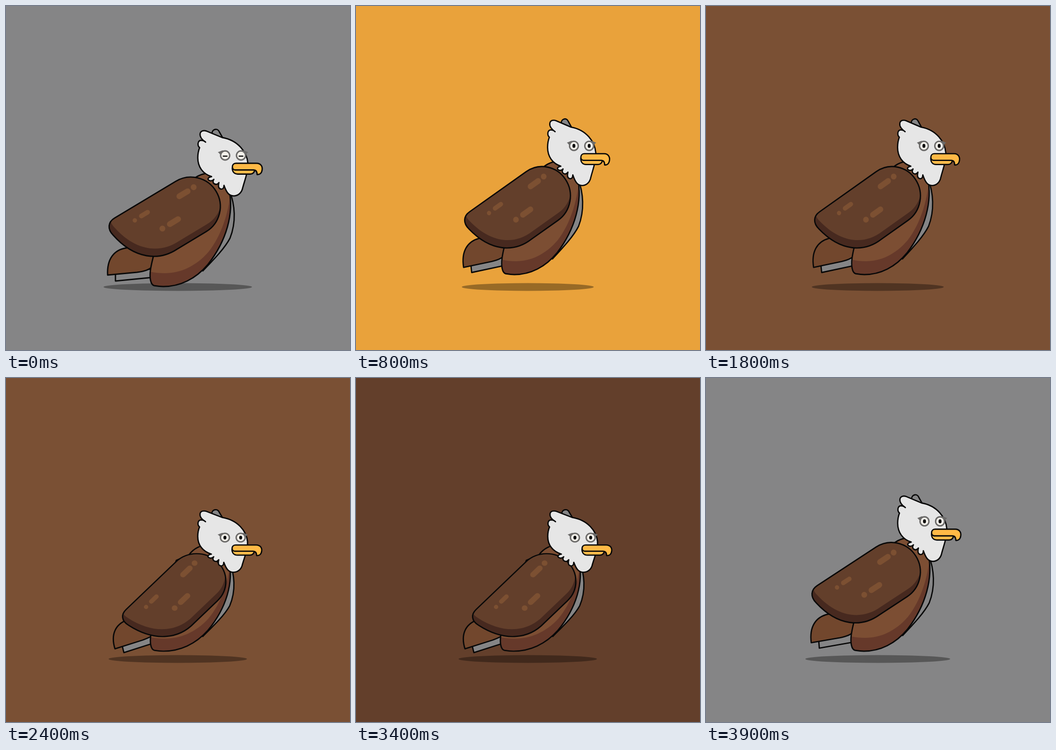
Recreate the animation shown at these times as an HTML page with a canvas. Size 748x748 px, loop 4 s.

```html
<!DOCTYPE html>
<html lang="en">
<head>
<meta charset="utf-8">
<title>Bouncing eagle</title>
<style>
html, body { margin: 0; width: 100%; height: 100%; overflow: hidden; background: #858586; }
canvas { display: block; width: 748px; height: 748px; }
</style>
</head>
<body>
<canvas id="stage" width="748" height="748"></canvas>
<script>
const ctx = document.getElementById('stage').getContext('2d');
const LOOP = 4000, BEAT = 1000, STEP = 100;
const GROUND = 610, AXIS = 406;
const INK = '#080808', GREY = '#858586', LID = '#6b6a69';
const BACKDROPS = [GREY, '#e9a23b', '#7a5034', '#633f2b'];

// Periodic track over one beat: keys are [phase, value].
function track(keys, linear) {
  const n = keys.length;
  const key = i => {
    const turn = Math.floor(i / n), [t, v] = keys[i - turn * n];
    return [t + turn, v];
  };
  const slope = i => {
    const [t0, v0] = key(i - 1), [t1, v1] = key(i + 1);
    return (v1 - v0) / (t1 - t0);
  };
  return p => {
    let i = n - 1;
    while (i > 0 && keys[i][0] > p + 1e-6) i--;
    const [t0, v0] = key(i), [t1, v1] = key(i + 1);
    const d = t1 - t0, u = (p - t0) / d;
    if (linear) return v0 + (v1 - v0) * u;
    const e = u * u * (3 - 2 * u);
    return v0 + (v1 - v0) * e
      + d * u * (1 - u) * ((1 - u) * slope(i) - u * slope(i + 1));
  };
}

const bottomAt = track([[0, 610], [.1, 615], [.2, 613], [.4, 594], [.6, 578], [.7, 578.5], [.8, 584], [.9, 594]]);
const widthAt = track([[0, 1], [.15, 1.033], [.4, .993], [.68, .955], [.8, .962], [.9, .98]]);
const heightAt = track([[0, 1], [.3, .93], [.4, .94], [.7, 1], [.8, 1], [.9, 1]]);
const dipAt = track([[0, 0], [.1, .25], [.4, 1], [.6, .6], [.8, .23], [.9, .12]]);
const tailAt = track([[0, 0], [.4, 13.2], [.6, 10.5], [.8, 6], [.9, 4.2]]);
const shadowAt = track([[0, 161.5], [.2, 170.5], [.6, 130.5], [.7, 129.5], [.9, 157.5]], true);

const shapes = {
  tail: 'M221 585C219 550 235 530 262 526L320 520V565C312 574 300 577 285 579Z',
  strip: 'M238 582V598L330 589V570Z',
  breast: 'M486 402C498 432 501 470 487 505C476 526 455 548 428 576Z',
  body: 'M398 387C408 372 425 364 440 364L485 400C496 450 480 510 439 562C412 594 378 610 342 610' +
    'C333 610 328 609 322 608C314 606 312 590 314 575C316 560 320 545 326 525L370 400Z',
  bodyLight: 'M488 405C484 450 468 500 440 535C412 567 378 581 345 581C333 581 322 580 310 577L300 355H470Z',
  wing: 'M-155 -64H0A64 64 0 0 1 0 64H-73C-120 66 -164 36 -177 -34C-181 -52 -172 -64 -155 -64Z',
  crest: 'M448 278C447 268 460 264 464 274L472 288Z',
  head: 'M421 308C416 304 416 293 424 292C428 292 432 294 434 296C428 292 421 285 422 278' +
    'C423 271 430 270 436 272L470 286C505 292 524 318 526 342V350C525 365 518 382 514 398' +
    'C511 408 503 413 495 413C484 413 479 404 474 390C474 395 472 399 467 398C462 397 461 392 463 384' +
    'C460 388 456 389 452 386C449 383 450 380 452 377C448 381 443 381 440 378C438 375 441 372 447 371' +
    'C428 365 417 350 417 330C417 320 419 313 421 308Z',
  lash: 'M-16 -7L-6 -11L-1 -10L-7 -3Q-13 -2 -13 -5Z',
  jaw: 'M492 352C492 361 497 365.5 504 365.5H531C537 365.5 540 362 541 356Z',
  beak: 'M500 342H545C554 342 558 349 557 356C556 364 551 367 546 366.5C546 361 544 356.5 538 356.5H498C490 356.5 490 342 500 342Z'
};
for (const name in shapes) shapes[name] = new Path2D(shapes[name]);

function paint(path, fill, line = INK, width = 2.9) {
  if (fill) { ctx.fillStyle = fill; ctx.fill(path); }
  if (line) { ctx.strokeStyle = line; ctx.lineWidth = width; ctx.stroke(path); }
}

function group(draw) {
  ctx.save();
  draw();
  ctx.restore();
}

function ellipse(x, y, rx, ry, fill) {
  ctx.beginPath();
  ctx.ellipse(x, y, rx, ry, 0, 0, 2 * Math.PI);
  ctx.fillStyle = fill;
  ctx.fill();
}

function stroke(x0, x1, y, width, color) {
  ctx.beginPath();
  ctx.moveTo(x0, y);
  ctx.lineTo(x1, y);
  ctx.lineWidth = width;
  ctx.strokeStyle = color;
  ctx.stroke();
}

function rotateAbout(x, y, degrees) {
  ctx.translate(x, y);
  ctx.rotate(-degrees * Math.PI / 180);
  ctx.translate(-x, -y);
}

// Fill a shape with its shade, lay the lit part inside, then outline it.
function shaded(path, shade, lit, color, dx = 0, dy = 0) {
  paint(path, shade, null);
  group(() => {
    ctx.clip(path);
    ctx.translate(dx, dy);
    paint(lit, color, null);
  });
  paint(path, null);
}

function drawTail(angle) {
  rotateAbout(313, 531, angle);
  paint(shapes.strip, GREY);
  paint(shapes.tail, '#72472d');
}

function drawWing(swing) {
  const spot = '#7c5032';
  rotateAbout(458, 392, swing);
  ctx.translate(402, 436);
  ctx.rotate(-31 * Math.PI / 180);
  shaded(shapes.wing, '#47291f', shapes.wing, '#633f2b', 11, -13);
  ellipse(26.8, -32.9, 6.4, 6.4, spot);
  ellipse(-77.8, 9.2, 6.4, 6.4, spot);
  ellipse(-120, -37, 4.8, 4.8, spot);
  stroke(-10, 11, -32, 12.5, spot);
  stroke(-59, -38, 9.2, 12.5, spot);
  stroke(-103, -87, -37.8, 10, spot);
}

function drawEye(x, side, closed) {
  ctx.translate(x, 325);
  group(() => {
    ctx.scale(side, 1);
    paint(shapes.lash, LID, null);
  });
  ellipse(0, 0, 11.4, 11.4, LID);
  ellipse(0, 0, 8.3, 8.3, '#f4f1ea');
  if (closed) stroke(-4, 4, 1.5, 2.6, INK);
  else ellipse(0, 0, 3.3, 4.4, INK);
}

function drawHead(dip, closed) {
  ctx.translate(0, 14.5 * dip);
  paint(shapes.crest, GREY);
  paint(shapes.head, '#e6e6e6');
  ctx.translate(0, 7.8 * dip);
  group(() => drawEye(476.5, 1, closed));
  group(() => drawEye(511, -1, closed));
  paint(shapes.jaw, '#fdbb4b');
  paint(shapes.beak, '#ffb946');
}

function drawScene(time) {
  const phase = (time % BEAT) / BEAT;
  const dip = dipAt(phase);
  ctx.fillStyle = BACKDROPS[Math.floor((time + BEAT / 2) / BEAT) % BACKDROPS.length];
  ctx.fillRect(0, 0, 748, 748);
  ellipse(373.5, 611, shadowAt(phase), 8.5, 'rgba(0,0,0,.35)');
  group(() => {
    ctx.lineJoin = ctx.lineCap = 'round';
    ctx.translate(AXIS, bottomAt(phase));
    ctx.scale(widthAt(phase), heightAt(phase));
    ctx.translate(-AXIS, -GROUND);
    group(() => drawTail(tailAt(phase)));
    paint(shapes.breast, GREY);
    shaded(shapes.body, '#66392a', shapes.bodyLight, '#7c4e33');
    group(() => drawWing(14.3 * dip));
    group(() => drawHead(dip, phase < .1));
  });
}

// The motion is held on tenths of a second.
function tick() {
  const time = performance.now() % LOOP;
  drawScene(Math.floor(time / STEP) * STEP);
  requestAnimationFrame(tick);
}
tick();
</script>
</body>
</html>
```
